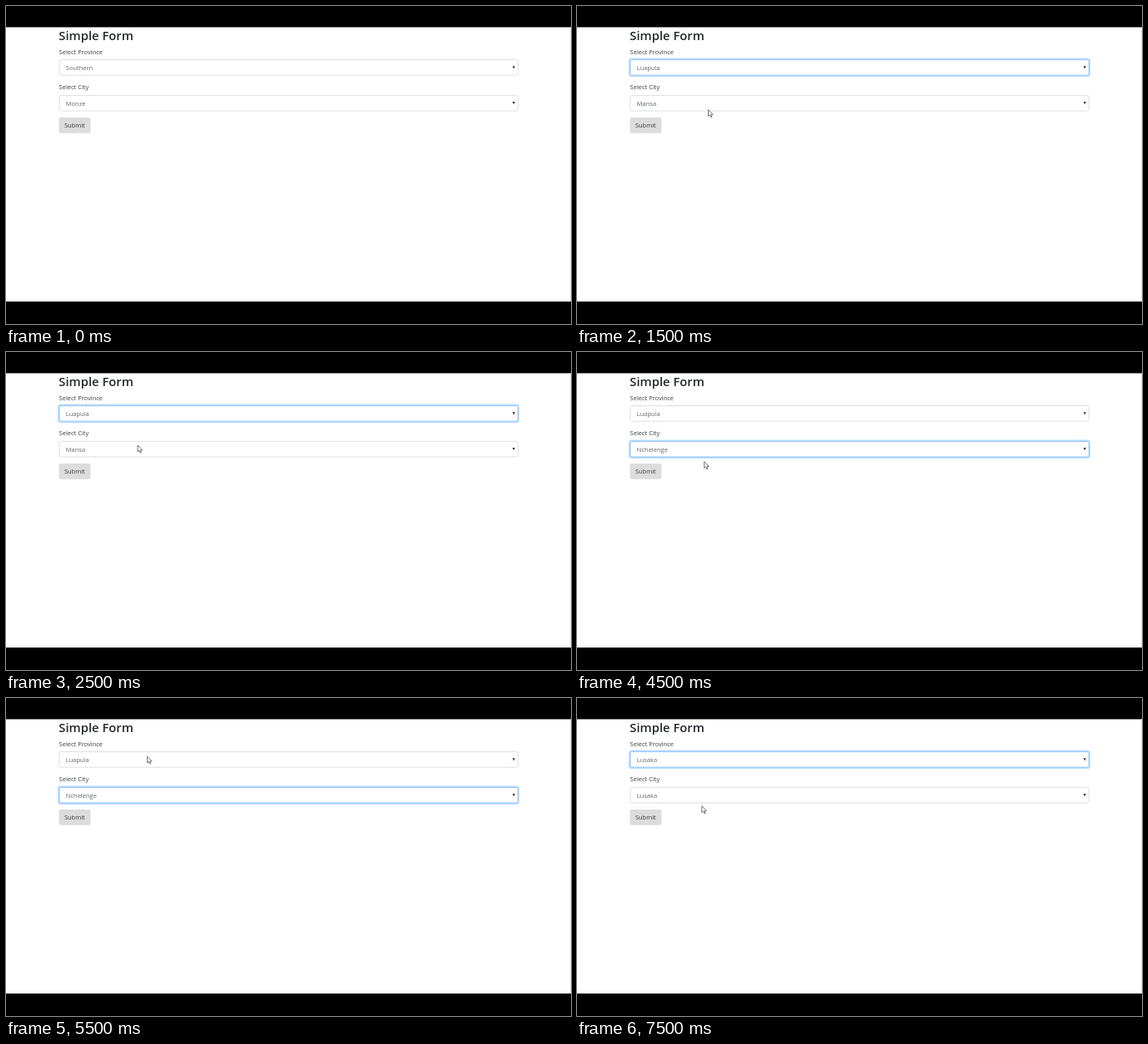
These frames come from a looping animation (678x382 px, 8000 ms). An HTML page:

```html
<!DOCTYPE html>
<html lang="en">
<head>
<meta charset="utf-8">
<title>Simple Form</title>
<style>
  html, body { margin: 0; width: 100%; height: 100%; overflow: hidden; background: #000; }
  svg { display: block; width: 678px; height: 382px; }
  text { font: 7.5px "Open Sans", "Noto Sans", sans-serif; fill: #3c4044; }
  .title { font-size: 14.8px; font-weight: 600; fill: #24282c; }
  .value { fill: #62676c; }
  .box { fill: #fff; stroke: #d9dcdf; stroke-width: .9; }
  .glow { fill: none; stroke: #bfdeff; stroke-width: 2; opacity: 0; }
  .focus .box { stroke: #80bdff; }
  .focus .glow { opacity: 1; }
  .arrow { fill: #333; }
  #cursor { fill: #fff; stroke: #555; stroke-width: .8; stroke-linejoin: round; }
</style>
</head>
<body>
<svg viewBox="0 0 678 382">
  <path fill="#fff" d="M0 25.5H678V355H0z"/>
  <path fill="#e6e6e6" d="M677 25.5h1V355h-1z"/>
  <text class="title" x="63.3" y="41.2">Simple Form</text>
  <text x="63.6" y="57.6">Select Province</text>
  <text x="63.6" y="100.4">Select City</text>
  <g id="province" transform="translate(64 64.6)">
    <rect class="glow" x="-1" y="-1" width="552" height="20.6" rx="2.5"/>
    <rect class="box" width="550.3" height="18.6" rx="1.8"/>
    <path class="arrow" d="M543.7 7.7h3.2l-1.6 3.2z"/>
    <text class="value" x="7.8" y="12.7"></text>
  </g>
  <g id="city" transform="translate(64 107.4)">
    <rect class="glow" x="-1" y="-1" width="552" height="20.6" rx="2.5"/>
    <rect class="box" width="550.3" height="18.6" rx="1.8"/>
    <path class="arrow" d="M543.7 7.7h3.2l-1.6 3.2z"/>
    <text class="value" x="7.8" y="12.7"></text>
  </g>
  <rect x="63.6" y="134" width="37.8" height="18.8" rx="1.8" fill="#dcdcdc"/>
  <text x="69.9" y="146.3">Submit</text>
  <path id="cursor" d="M0 0V8l1.9-1.7 1.3 2.9 1.2-.6-1.2-2.7h2.4z"/>
</svg>
<script>
  const LOOP = 8000, STEP = 1000, FIRST = 500;
  // province, city, focused field, cursor tip
  const states = [
    ["Southern", "Monze", "", null],
    ["Southern", "Monze", "", [169.7, 69]],
    ["Luapula", "Mansa", "province", [157.5, 124.5]],
    ["Luapula", "Mansa", "province", [158, 112]],
    ["Luapula", "Mansa", "city", [147.5, 148]],
    ["Luapula", "Nchelenge", "city", [152.7, 131.6]],
    ["Luapula", "Nchelenge", "city", [169.5, 70]],
    ["Luapula", "Mansa", "province", [149.8, 129.7]],
    ["Lusaka", "Lusaka", "province", [149.8, 129.7]],
  ];
  const byId = id => document.getElementById(id);
  const cursor = byId("cursor");

  function setField(id, value, focused) {
    const field = byId(id);
    field.querySelector("text").textContent = value;
    field.classList.toggle("focus", focused === id);
  }

  let shown = -1;
  function draw(now) {
    const index = Math.floor((now % LOOP + STEP - FIRST) / STEP);
    if (index !== shown) {
      shown = index;
      const [province, city, focused, tip] = states[index];
      setField("province", province, focused);
      setField("city", city, focused);
      cursor.style.display = tip ? "" : "none";
      if (tip) cursor.setAttribute("transform", `translate(${tip})`);
    }
    requestAnimationFrame(() => draw(performance.now()));
  }
  draw(performance.now());
</script>
</body>
</html>
```
